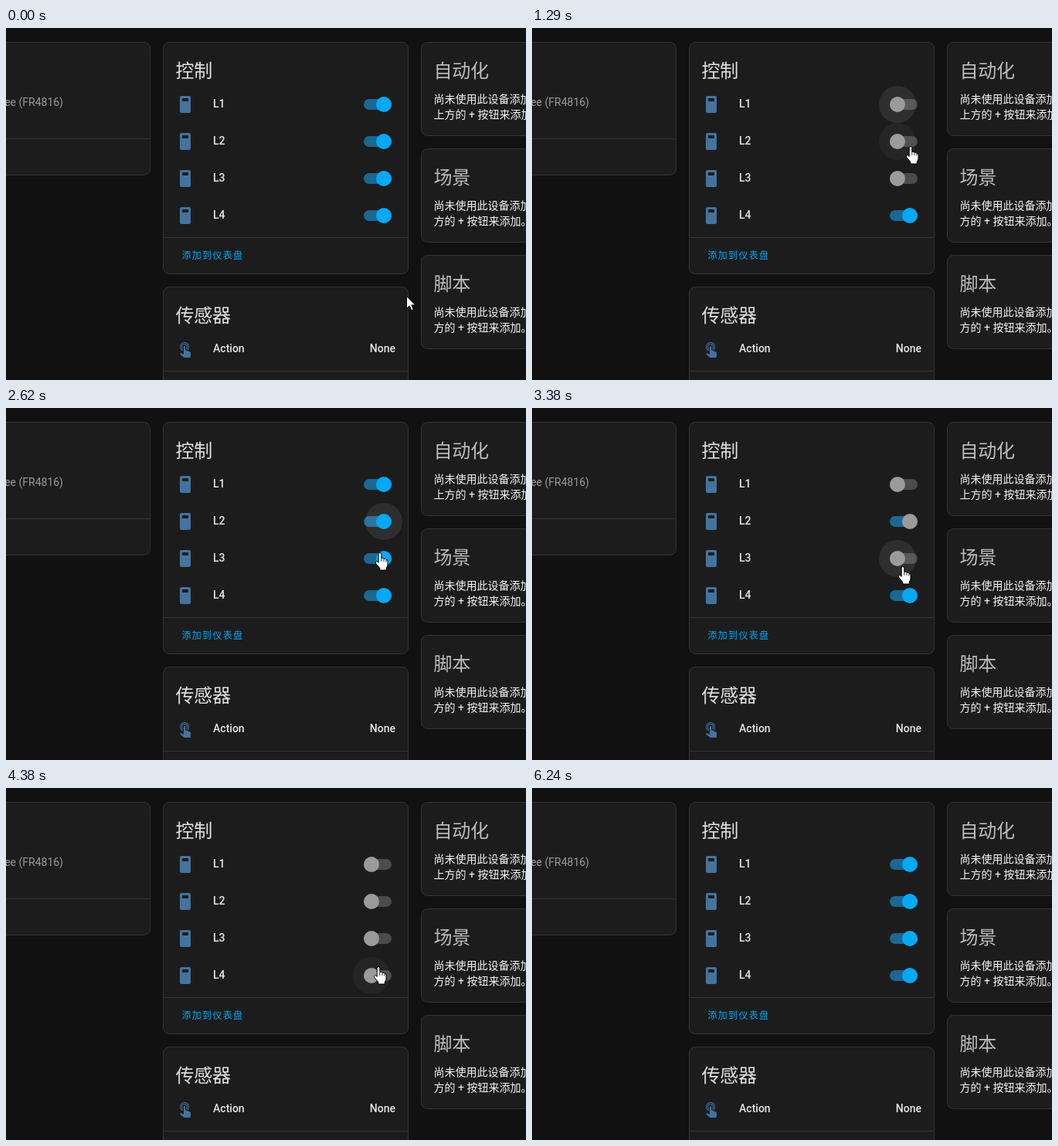
An HTML page that plays this animation: 673 by 456 pixels, repeating every 6340 ms.

```html
<!DOCTYPE html>
<html lang="zh-CN">
<head>
<meta charset="utf-8">
<title>控制</title>
<style>
  html, body { margin: 0; width: 100%; height: 100%; overflow: hidden; background: #111; }
  svg { display: block; width: 673px; height: 456px; }
  text { font: 14px Roboto, "Noto Sans CJK SC", "Noto Sans CJK", sans-serif; fill: #f4f4f4; white-space: pre; }
  .card { fill: #1c1c1c; stroke: #333; }
  .line { stroke: #333; }
  .title { font-size: 24px; font-weight: 500; letter-spacing: -.012em; fill: #e1e1e1; }
  .dim { fill: #bdbdbd; }
  .row { font-weight: 500; fill: #e6e6e6; }
  .model { fill: #9b9b9b; text-anchor: end; }
  .link { font-size: 12px; letter-spacing: 1.3px; fill: #03a9f4; }
  .end { text-anchor: end; }
  .icon { fill: #44739e; }
  .rings { fill: none; stroke: #44739e; stroke-width: 1.1; }
  .cursor { fill: #fff; stroke: #000; stroke-linejoin: round; }
</style>
</head>
<body>
<svg id="stage" viewBox="0 0 673 456" xmlns="http://www.w3.org/2000/svg"></svg>
<script>
const stage = document.getElementById('stage');
const LOOP = 6340;

function add(tag, attrs, parent = stage, content) {
  const el = document.createElementNS('http://www.w3.org/2000/svg', tag);
  for (const k in attrs) el.setAttribute(k, attrs[k]);
  if (content) el.textContent = content;
  parent.append(el);
  return el;
}
const text = (x, y, cls, s) => add('text', { x, y, class: cls }, stage, s);
const card = (x, y, width, height) =>
  add('rect', { x: x + .5, y: y + .5, width: width - 1, height: height - 1, rx: 8, class: 'card' });
const line = (x1, x2, y) => add('path', { d: `M${x1} ${y + .5}H${x2}`, class: 'line' });

// Left column
card(-131, 18, 318, 173);
line(-130, 186, 143);
text(74, 101, 'model', 'ee (FR4816)');

// Middle column
card(203, 18, 318, 301);
text(219.5, 63.5, 'title', '控制');
line(204, 520, 271);
text(227.5, 299, 'link', '添加到仪表盘');
card(203, 335, 318, 140);
text(219.5, 380.5, 'title', '传感器');
text(268, 420, 'row', 'Action');
text(504, 420, 'row end', 'None');
line(204, 520, 444);

const tap = add('g', { transform: 'translate(220 404)' });
add('path', { class: 'rings', d: 'M9 11.9A3.5 3.5 0 1 1 13 11.9M9 14.1A5.5 5.5 0 1 1 14.7 13.1' }, tap);
add('path', { class: 'icon', d: 'M10 9a1 1 0 0 1 2 0v4.5l1.2.1 5 2.2q.8.4.8 1.3v4.4q-.1 1.4-1.5 1.5H11q-.6 0-1-.4l-4.9-4.2.7-.8q.4-.4 1-.3L10 19z' }, tap);

// Right column
[
  ['自动化', '尚未使用此设备添加任何自动化', '上方的 + 按钮来添加。'],
  ['场景', '尚未使用此设备添加任何场景', '方的 + 按钮来添加。'],
  ['脚本', '尚未使用此设备添加任何脚本', '方的 + 按钮来添加。']
].forEach(([name, a, b], i) => {
  const y = 18 + i * 138;
  card(537, y, 318, 122);
  text(553.5, y + 45.5, 'title dim', name);
  text(553.5, y + 79, '', a);
  text(553.5, y + 99, '', b);
});

// Switch rows
const rows = [0, 1, 2, 3].map(i => {
  const y = 99 + i * 48;
  add('rect', { x: 225, y: y - 11, width: 14, height: 22, rx: 2, class: 'icon' });
  add('rect', { x: 228, y: y - 8, width: 8, height: 4, rx: .8, fill: '#1c1c1c' });
  text(268, y + 4, 'row', 'L' + (i + 1));
  return {
    track: add('rect', { x: 463, y: y - 7, width: 36, height: 14, rx: 7 }),
    ripple: add('circle', { cy: y, r: 24, fill: '#fff' }),
    knob: add('circle', { cy: y, r: 10 })
  };
});

const cursors = {
  arrow: add('path', { class: 'cursor', d: 'M.5 .5V16.5L4.2 13L6.7 18.7L9.4 17.5L6.9 11.9H11.7Z' }),
  hand: add('g', {})
};
add('path', { class: 'cursor', d: 'M-1.8 1.3Q-1.8 -.5 0 -.5T1.8 1.3V6.4Q4.4 5.6 5 7.3Q7.2 6.8 7.8 8.4Q10 8.2 10 10.5V15Q10 17.5 8.3 19V22H-.2V19.5L-5.2 13.5Q-6.3 11.3-4.6 10.7Q-3.4 10.4-1.8 12.4Z' }, cursors.hand);
add('path', { d: 'M1.8 6.4V11M5 7.5V11M7.9 8.7V11.5', stroke: '#000', 'stroke-width': .8, fill: 'none' }, cursors.hand);

// 1 on, 0 off, m knob grey but not yet moved
const switches = [
  [0, '1111'], [430, 'm111'], [650, '0111'], [860, '0m11'], [970, '0011'],
  [1180, '0001'], [1510, '0000'], [1840, '0100'], [1950, '1100'],
  [2290, '1110'], [2620, '1111'], [3050, '11m1'], [3160, '1101'],
  [3270, '0101'], [3380, '0m01'], [3490, '0001'], [3830, '0000'],
  [4600, '0001'], [5040, '1001'], [5250, '1101'], [5460, '1111']
];
// Ripple strength per row, in percent of white
const ripples = [
  [0, '0000'], [650, '8000'], [1290, '8400'], [1510, '8700'], [1730, '0800'],
  [2720, '0840'], [3050, '0080'], [4160, '0000'], [4380, '0004'],
  [4490, '0008'], [6240, '0000']
];
const pointer = [
  [0, 'arrow', 518, 347], [100, 'arrow', 516, 318], [210, 'arrow', 506, 217],
  [320, 'hand', 490, 122], [430, 'hand', 486, 102], [970, 'hand', 487, 112],
  [1080, 'hand', 488, 133], [1180, 'hand', 489, 148], [1290, 'hand', 490, 154],
  [1730, 'hand', 490, 161], [2510, 'hand', 488, 170], [2620, 'hand', 484, 188],
  [2720, 'hand', 481, 202], [2830, 'hand', 480, 206], [4050, 'hand', 480, 212],
  [4160, 'hand', 481, 222], [4270, 'hand', 482, 229], [4380, 'hand', 482, 232],
  [4820, 'hand', 484, 234], [5690, 'arrow', 500, 290], [5800, 'arrow', 529, 372],
  [5910, 'none', 0, 0]
];
const at = (track, t) => track.findLast(step => step[0] <= t);

function draw(t) {
  const state = at(switches, t)[1];
  const glow = at(ripples, t)[1];
  rows.forEach(({ track, ripple, knob }, i) => {
    const right = state[i] !== '0';
    const x = right ? 489 : 473;
    track.setAttribute('fill', right ? '#1b6892' : '#4b4b4b');
    knob.setAttribute('fill', state[i] === '1' ? '#03a9f4' : '#9b9b9b');
    knob.setAttribute('cx', x);
    ripple.setAttribute('cx', x);
    ripple.setAttribute('opacity', glow[i] / 100);
  });
  const [, shape, x, y] = at(pointer, t);
  for (const name in cursors) {
    cursors[name].setAttribute('visibility', name === shape ? 'visible' : 'hidden');
    cursors[name].setAttribute('transform', `translate(${x} ${y})`);
  }
}

const start = performance.now();
function tick() {
  draw((performance.now() - start) % LOOP);
  requestAnimationFrame(tick);
}
tick();
</script>
</body>
</html>
```
